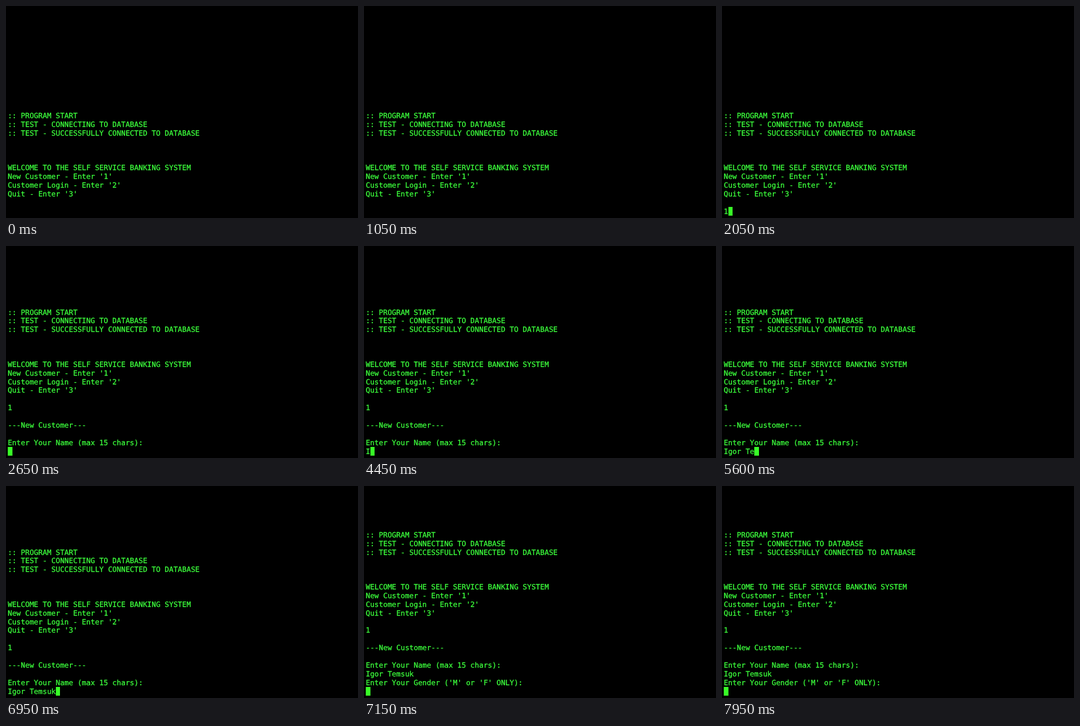
Animation of 600 by 363 pixels, one loop 8 s. Source, as an HTML page:

```html
<!DOCTYPE html>
<html lang="en">
<head>
<meta charset="utf-8">
<title>Terminal</title>
<style>
  html, body { margin: 0; width: 100%; height: 100%; overflow: hidden; background: #000; }
  #screen {
    position: absolute; left: 3px; bottom: calc(100% - 359.4px); margin: 0;
    font: 12.35px/14.88px "DejaVu Sans Mono", monospace;
    text-rendering: geometricPrecision;
    -webkit-text-stroke: .3px;
    color: #3cff3c;
  }
  #cursor {
    display: inline-block; position: relative; left: .3px; top: -.5px;
    width: 1ch; height: 14.88px; vertical-align: top;
    background: #38fe27;
  }
</style>
</head>
<body>
<pre id="screen"><span id="text"></span><span id="cursor"></span></pre>
<script>
const LOOP = 8000, BLINK = 500, HOLD = 1000;

const intro = `:: PROGRAM START
:: TEST - CONNECTING TO DATABASE
:: TEST - SUCCESSFULLY CONNECTED TO DATABASE



WELCOME TO THE SELF SERVICE BANKING SYSTEM
New Customer - Enter '1'
Customer Login - Enter '2'
Quit - Enter '3'

`;

// Output appended to the terminal: [time in ms, string]
const events = [
  [1950, "1"],
  [2650, "\n\n---New Customer---\n\nEnter Your Name (max 15 chars):\n"],
  [4450, "I"], [4650, "g"], [4800, "o"], [4950, "r"], [5100, " "],
  [5350, "T"], [5600, "e"], [5950, "m"], [6600, "s"], [6650, "u"], [6800, "k"],
  [7150, "\nEnter Your Gender ('M' or 'F' ONLY):\n"],
];

const text = document.getElementById("text");
const cursor = document.getElementById("cursor");

// The cursor stays lit after activity, then blinks.
function cursorLit(idle) {
  return idle < HOLD || Math.floor((idle - HOLD) / BLINK) % 2 === 1;
}

function draw(now) {
  const t = now % LOOP;
  const past = events.filter(([time]) => time <= t);
  const last = past.length ? past[past.length - 1][0] : -1350;
  const content = intro + past.map(([, s]) => s).join("");
  if (text.textContent !== content) text.textContent = content;
  cursor.style.visibility = cursorLit(t - last) ? "visible" : "hidden";
  requestAnimationFrame(draw);
}

draw(0);
</script>
</body>
</html>
```
